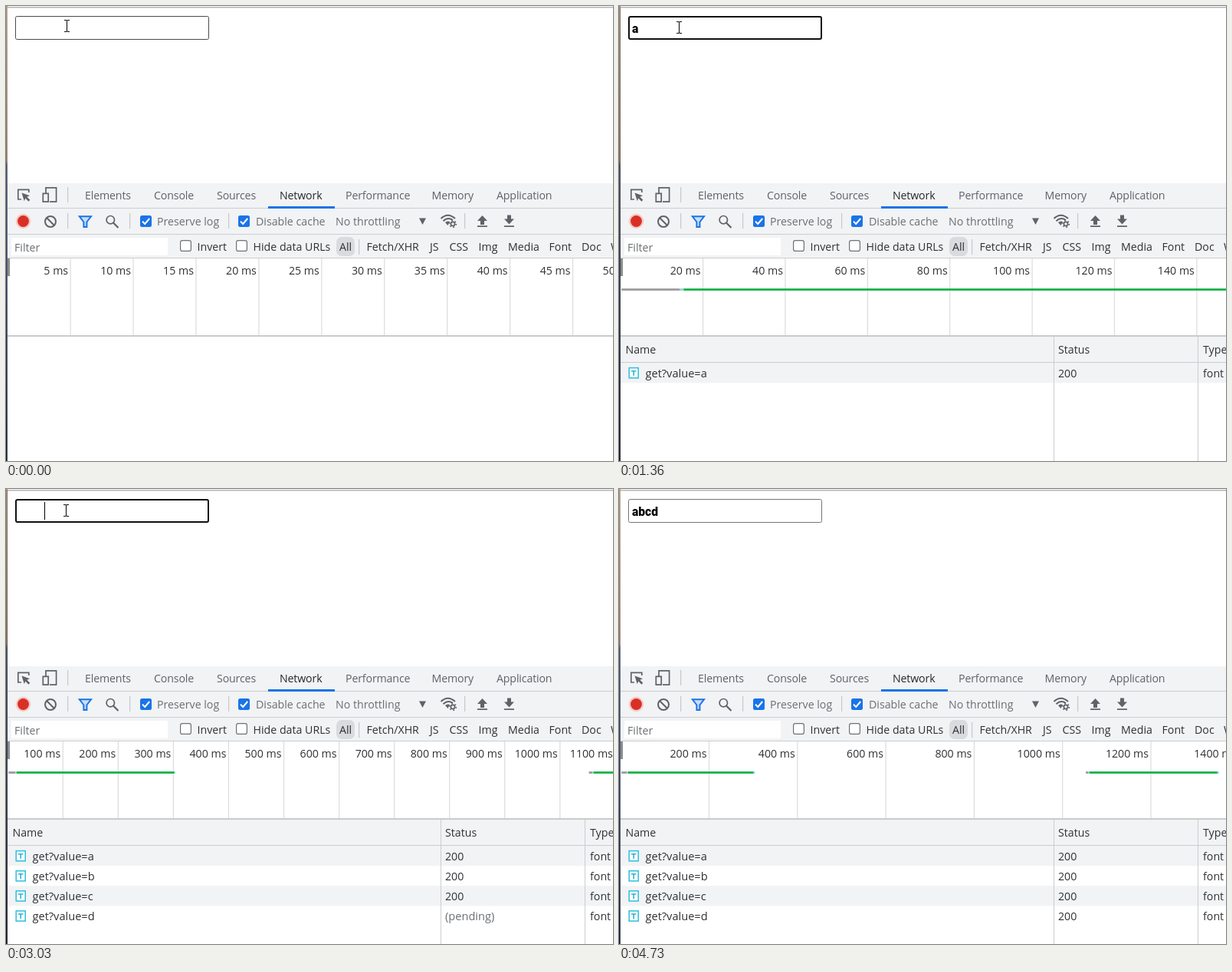
Animation, 792 px wide and 593 px high, one loop 4.83 s. Source, as an HTML page:

```html
<!DOCTYPE html>
<html lang="en">
<head>
<meta charset="utf-8">
<title>Font requests while typing</title>
<style>
html, body { margin: 0; width: 100%; height: 100%; overflow: hidden; background: #fff; }
svg { display: block; width: 792px; height: 593px; }
text { font: 14.2px "Open Sans", "Noto Sans", sans-serif; fill: #303134; white-space: pre; }
.tab { fill: #5f6368; letter-spacing: -0.15px; }
.on { fill: #27282b; }
.dim { fill: #6b6f73; }
.row { font-size: 14.6px; }
.plain { font-style: italic; font-weight: 500; font-size: 17px; fill: #000; }
.heavy { font-family: Roboto, sans-serif; font-weight: 900; font-stretch: 75%; font-size: 16px; fill: #000; }
.icon { fill: none; stroke: #5f6368; stroke-width: 1.7; }
</style>
</head>
<body>
<svg id="stage" viewBox="0 0 792 593">
  <defs>
    <linearGradient id="desk" x1="0" y1="0" x2="0" y2="1">
      <stop offset="0" stop-color="#ab9785"/>
      <stop offset=".34" stop-color="#8f7864"/>
      <stop offset=".35" stop-color="#4c5672"/>
      <stop offset=".6" stop-color="#39435f"/>
      <stop offset="1" stop-color="#1d2438"/>
    </linearGradient>
  </defs>
  <g id="still"></g>
  <g id="live"></g>
</svg>
<script>
const LOOP = 4830;
const still = document.getElementById('still');
const live = document.getElementById('live');

const rect = (x, y, w, h, fill, extra = '') =>
  `<rect x="${x}" y="${y}" width="${w}" height="${h}" fill="${fill}" ${extra}/>`;
const text = (x, y, s, cls = '', extra = '') =>
  `<text x="${x}" y="${y}" class="${cls}" ${extra}>${s}</text>`;
const icon = (d, extra = '') => `<path class="icon" d="${d}" ${extra}/>`;
const solid = (d, fill = '#5f6368') => `<path d="${d}" fill="${fill}"/>`;

// Each track is a list of [start, ...values]; the last entry begun is valid.
const at = (track, t) => track.reduce((cur, step) => step[0] <= t ? step : cur);

const zoom = [[0, 15], [1080, 10], [1890, 4], [2160, 3], [2440, 2], [3030, 1], [3300, 0]];
const typed = [[0, 0], [800, 1], [1890, 2], [2440, 3], [3030, 4]];
const loaded = [[0, 0], [1080, 1], [2160, 2], [2750, 3], [3300, 4]];
const styled = [[0, 0], [1210, 1], [2160, 2], [2880, 3], [3300, 4]];
const caret = [[0, 0], [270, 1], [1360, 0], [1890, 1], [3590, 0], [4100, 1], [4590, 0]];
const mouse = [
  [0, 'beam', 79.5, 26], [150, 'beam', 78.5, 28], [3960, 'arrow', 119, 83],
  [4100, 'arrow', 420, 350], [4220, 'arrow', 676.5, 582], [4340, 'arrow', 686, 588], [4470, '', 0, 0]
];
// start, connected and end of each visible request, in ms
const requests = [[0, 14.3, 303], [1051, 1059, 1353]];

function checkbox(x, y, checked) {
  return checked
    ? rect(x, y, 15, 15, '#1a73e8', 'rx="2.5"') +
      `<path d="M${x + 3} ${y + 7.8}l3.2 3.2 6-7" fill="none" stroke="#fff" stroke-width="2"/>`
    : rect(x + .6, y + .6, 13.8, 13.8, '#fff', 'rx="2.5" stroke="#6f7275" stroke-width="1.2"');
}

function toolbar() {
  let s = rect(2, 231, 790, 98, '#f1f3f4');
  for (const y of [263, 297, 328]) s += rect(2, y, 790, 1, '#cbcdd1');

  s += icon('M20 252H15.8V239.3H29.8V243') + solid('M20.5 243.5L31 247.2 27.3 248.7 31.3 252.8 29.4 254.7 25.3 250.6 23.8 254.3Z');
  s += icon('M52 244V236.8H65.6V255.2H57') + icon('M48.3 244.3h6.9v10.9h-6.9Z');
  for (const [x, y] of [[80, 236], [80, 270], [161, 270], [290, 270], [598, 270], [460, 304]])
    s += rect(x, y, 1.2, 20, '#c6c9cd');

  const tabs = [[103, 'Elements'], [193, 'Console'], [275, 'Sources'], [357, 'Network'],
    [443, 'Performance'], [555.5, 'Memory'], [640, 'Application']];
  for (const [x, name] of tabs) s += text(x, 252, name, name === 'Network' ? 'tab on' : 'tab');
  s += rect(342, 261, 87, 3, '#1a73e8');

  s += '<circle cx="22.5" cy="280.5" r="9.7" fill="#f6c9c6"/><circle cx="22.5" cy="280.5" r="7.4" fill="#d93025"/>';
  s += '<circle class="icon" cx="58" cy="281" r="7" style="stroke-width:2"/>' + icon('M53 276l10 10', 'style="stroke-width:2"');
  s += '<path d="M95.8 274.3H111L105.4 281.5V288H101.4V281.5Z" fill="#c9defa" stroke="#1a73e8" stroke-width="2"/>';
  s += '<circle class="icon" cx="136.3" cy="278.7" r="5.2"/>' + icon('M140 282.5l6.5 6.5', 'style="stroke-width:2.2"');
  s += checkbox(175, 273, true) + text(197, 286, 'Preserve log', 'dim');
  s += checkbox(303, 273, true) + text(326, 286, 'Disable cache', 'dim');
  s += text(430, 286, 'No throttling', 'dim') + solid('M539 276.5h9l-4.5 8.5Z');
  s += icon('M567.5 277Q576.5 268.5 586 277M570.5 280.2Q576.5 274.5 583 279', 'style="stroke-width:2"');
  s += solid('M573 282Q576 279.5 579 281L576.5 286Z');
  s += '<circle class="icon" cx="583" cy="284" r="2.6"/><circle class="icon" cx="583" cy="284" r="4.3" stroke-dasharray="1.7 2.8"/>';
  s += solid('M621.5 273l6.5 7h-4v5h-5v-5h-4ZM615 286.3h13v1.8h-13Z');
  s += solid('M656.5 284.5l6.5-7h-4v-5h-5v5h-4ZM650 286.3h13v1.8h-13Z');

  s += rect(7, 302, 204, 23, '#fff') + text(11, 319.5, 'Filter', 'dim');
  s += checkbox(227, 305, false) + text(249.5, 319, 'Invert');
  s += checkbox(300, 305, false) + text(322.5, 319, 'Hide data URLs');
  s += rect(431, 301, 24, 25, '#d9dbde', 'rx="7"');
  const kinds = [[435, 'All'], [470.5, 'Fetch/XHR'], [553, 'JS'], [578.5, 'CSS'], [616.5, 'Img'],
    [655, 'Media'], [708.5, 'Font'], [751, 'Doc'], [789, 'WS']];
  for (const [x, name] of kinds) s += text(x, 319, name);
  return s;
}

function timeline(t) {
  const scale = 0.5765 * 1.25 ** at(zoom, t)[1];
  const px = ms => 2.2 + ms * scale;
  // smallest 1-2-5 step that leaves 64 px between dividers
  let step = 10 ** Math.ceil(Math.log10(64 / scale));
  if (step * .2 * scale >= 64) step *= .2;
  else if (step * .5 * scale >= 64) step *= .5;
  step = Math.round(step);

  let s = '';
  for (let ms = step; px(ms) < 850; ms += step) {
    const x = px(ms);
    s += rect((x - .6).toFixed(2), 329, 1.2, 101, '#dcdcdc');
    s += text((x - 3).toFixed(2), 350, ms + ' ms', '', 'text-anchor="end"');
  }
  if (t >= 1080) {
    for (const [from, ready, to] of requests) {
      const a = px(from) + 1, b = px(ready), c = Math.max(b + 1.2, px(ready + 1)), d = px(to);
      if (a > 792) continue;
      s += rect(a, 368.2, b - a, 2.7, '#999') + rect(b, 368.2, c - b, 2.7, '#9ccfd4');
      s += rect(c, 368.2, d - c - 1.5, 2.7, '#0bb043') + rect(d - 1.5, 368.2, 1.5, 2.7, '#66c3b9');
    }
  }
  return s + rect(2, 329, 3, 23, '#8c8c8c') + rect(2, 429, 790, 2, '#cacaca');
}

function table(t) {
  const count = at(typed, t)[1], done = at(loaded, t)[1];
  if (!count) return '';
  let s = rect(2, 431, 790, 34, '#f1f3f4') + rect(2, 464, 790, 1, '#cbcdd1');
  s += text(8.5, 453, 'Name') + text(573, 453, 'Status') + text(762, 453, 'Type');
  for (let i = 0; i < count; i++) {
    const y = 465 + i * 26.1;
    if (i % 2 === 0) s += rect(2, y, 790, 26.2, '#f2f3f5');
    s += rect(13.2, y + 6.6, 12, 13.2, '#fff', 'stroke="#2cc0dc" stroke-width="1.5"');
    s += solid(`M16 ${y + 10}h6.4v1.5h-2.4v5.3h-1.6v-5.3h-2.4Z`, '#2cb3d0');
    s += text(34.5, y + 19, 'get?value=' + 'abcd'[i], 'row');
    s += i < done ? text(573, y + 19, '200') : text(573, y + 19, '(pending)', 'row dim');
    s += text(762, y + 19, 'font');
  }
  for (const x of [567, 755]) s += rect(x, 431, 1, 162, '#cbcdd1');
  return s;
}

function field(t) {
  const focus = t >= 270 && t < 4730;
  const n = at(typed, t)[1], ready = at(styled, t)[1] === n;
  let s = focus
    ? rect(13, 14, 251, 29, '#fff', 'rx="2" stroke="#101010" stroke-width="2"')
    : rect(12.5, 13.5, 252, 30, '#fff', `rx="2" stroke="${t < 270 ? '#4a4a4a' : '#767676'}"`);
  if (n && ready) s += text(17, 35, 'abcd'.slice(0, n), 'heavy', `style="font-size:${heavySize}px"`);
  else if (n === 1) s += text(0, 0, 'a', 'plain', 'transform="translate(16.5 35) skewX(12)"');
  if (at(caret, t)[1]) s += rect(Math.floor(17 + 8.45 * n), 17, 1, 23, '#000');
  return s;
}

function pointer(t) {
  const [, kind, x, y] = at(mouse, t);
  const shapes = {
    beam: '<path d="M-3.5-7.5H-1L0-6.8 1-7.5H3.5M0-7V7M-3.5 7.5H-1L0 6.8 1 7.5H3.5" fill="none" stroke="#111" stroke-width="1.1"/>',
    arrow: '<path d="M.5.5V16.5L4.2 13 6.6 18.5 8.8 17.5 6.4 12.2H11.5Z" fill="#fff" stroke="#111"/>'
  };
  return kind ? `<g transform="translate(${x} ${y})">${shapes[kind]}</g>` : '';
}

function edge(t) {
  const active = t >= 150 && t < 4730;
  return rect(1, 1, 1, 592, active ? '#3a302a' : '#fff', `opacity="${active ? .4 : .15}"`);
}

// Pick the heavy type size whose four letters end at the caret.
live.innerHTML = text(0, 0, 'abcd', 'heavy');
const heavySize = 16 * 34 / live.firstChild.getComputedTextLength();

still.innerHTML = rect(0, 0, 792, 593, '#fff') + rect(0, 0, 2, 593, 'url(#desk)') +
  rect(2, 1, 790, 1.5, '#b5b5b5') + toolbar();

const marks = [...new Set([zoom, typed, loaded, styled, caret, mouse, [[4730]]].flat().map(s => s[0]))];
let shown = -1;

function draw(now) {
  const t = now % LOOP;
  const mark = Math.max(...marks.filter(m => m <= t));
  if (mark !== shown) {
    shown = mark;
    live.innerHTML = edge(t) + timeline(t) + table(t) + field(t) + pointer(t);
  }
}

const start = performance.now();
function tick() {
  draw(performance.now() - start);
  requestAnimationFrame(tick);
}
tick();
</script>
</body>
</html>
```
